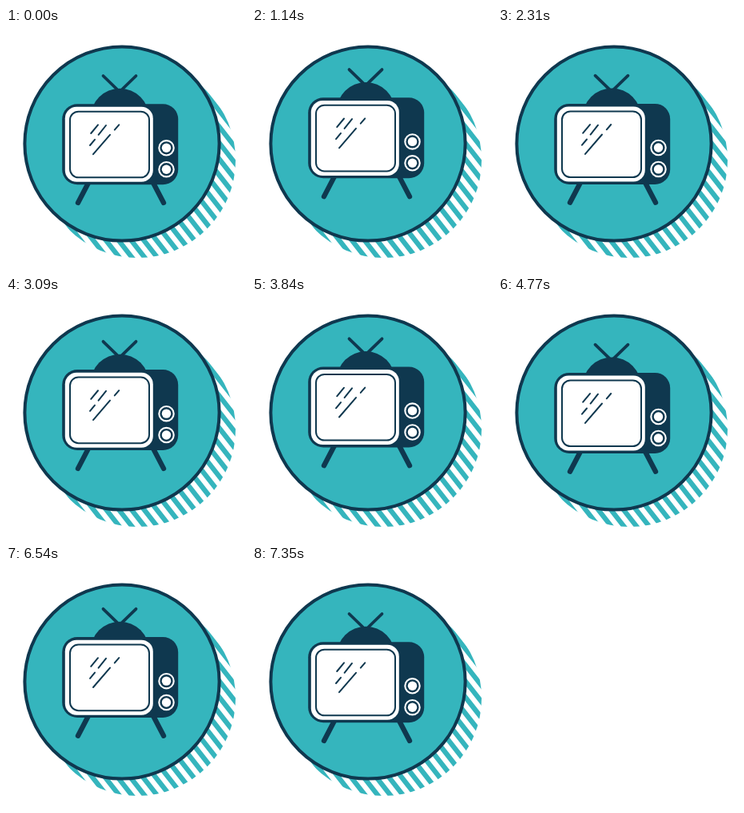
Recreate the animation shown at these times as an HTML page with a canvas. Size 300x302 px, loop 7380 ms.

```html
<!DOCTYPE html>
<html lang="en">
<head>
<meta charset="utf-8">
<title>Television</title>
<style>
html, body { margin: 0; width: 100%; height: 100%; overflow: hidden; background: #fff; }
canvas { display: block; width: 300px; height: 302px; }
</style>
</head>
<body>
<canvas id="stage"></canvas>
<script>
const W = 300, H = 302;
const LOOP = 7380, STEP = 30, BOBS = 3, LIFT = 8;
const TEAL = '#35b5bd', NAVY = '#0f384f', WHITE = '#fff';

const canvas = document.getElementById('stage');
const ctx = canvas.getContext('2d');
const ratio = window.devicePixelRatio || 1;
canvas.width = W * ratio;
canvas.height = H * ratio;
ctx.lineCap = 'round';

function disc(x, y, r, color) {
  ctx.beginPath();
  ctx.arc(x, y, r, 0, Math.PI * 2);
  ctx.fillStyle = color;
  ctx.fill();
}

function ring(x, y, r, width, color) {
  ctx.beginPath();
  ctx.arc(x, y, r, 0, Math.PI * 2);
  ctx.lineWidth = width;
  ctx.strokeStyle = color;
  ctx.stroke();
}

function line(x1, y1, x2, y2, width) {
  ctx.beginPath();
  ctx.moveTo(x1, y1);
  ctx.lineTo(x2, y2);
  ctx.lineWidth = width;
  ctx.strokeStyle = NAVY;
  ctx.stroke();
}

function box(x, y, w, h, r) {
  ctx.beginPath();
  ctx.roundRect(x, y, w, h, r);
}

function hatch() {
  const pitch = 12.45, thick = 6.2, edge = 118;
  ctx.save();
  ctx.beginPath();
  ctx.arc(164.5, 165.5, 122.5, 0, Math.PI * 2);
  ctx.clip();
  ctx.translate(164.5, 165.5);
  ctx.rotate(52 * Math.PI / 180);
  ctx.fillStyle = TEAL;
  for (let y = edge; y > -130; y -= pitch) {
    ctx.fillRect(-130, y - thick / 2, 260, thick);
  }
  ctx.restore();
}

function badge() {
  disc(145, 145, 122, TEAL);
  ring(145, 145, 121.6, 4, NAVY);
}

function knob(y) {
  ring(200.5, y, 9.2, 2.1, WHITE);
  disc(200.5, y, 5.7, WHITE);
}

function television() {
  line(121.5, 60, 140, 78, 3.8);
  line(162.5, 60, 144, 78, 3.8);
  disc(142.3, 112.4, 36.6, NAVY);
  line(103, 194, 90, 219, 6.3);
  line(184, 194, 197, 219, 6.3);

  box(70.2, 95.2, 145, 101, 19);
  ctx.fillStyle = NAVY;
  ctx.fill();
  box(73.8, 98.8, 110, 94, 14.5);
  ctx.fillStyle = WHITE;
  ctx.fill();
  box(80, 104.7, 99, 82.6, 10.5);
  ctx.lineWidth = 2;
  ctx.strokeStyle = NAVY;
  ctx.stroke();

  line(106.2, 132, 115, 121.4, 2);
  line(105, 147, 111, 139.8, 2);
  line(115.6, 133.8, 125, 122, 2);
  line(109, 158.2, 130, 133.8, 2);
  line(135.8, 127.6, 141.2, 121.3, 2);

  knob(150.3);
  knob(177.2);
}

function draw(t) {
  const phase = t / LOOP * BOBS * Math.PI * 2;
  ctx.setTransform(ratio, 0, 0, ratio, 0, 0);
  ctx.fillStyle = WHITE;
  ctx.fillRect(0, 0, W, H);
  hatch();
  badge();
  ctx.translate(0, -LIFT * (1 - Math.cos(phase)) / 2);
  television();
}

let start = null;
function tick(now) {
  if (start === null) start = now;
  const t = (now - start) % LOOP;
  draw(Math.floor(t / STEP) * STEP);
  requestAnimationFrame(tick);
}
draw(0);
requestAnimationFrame(tick);
</script>
</body>
</html>
```
